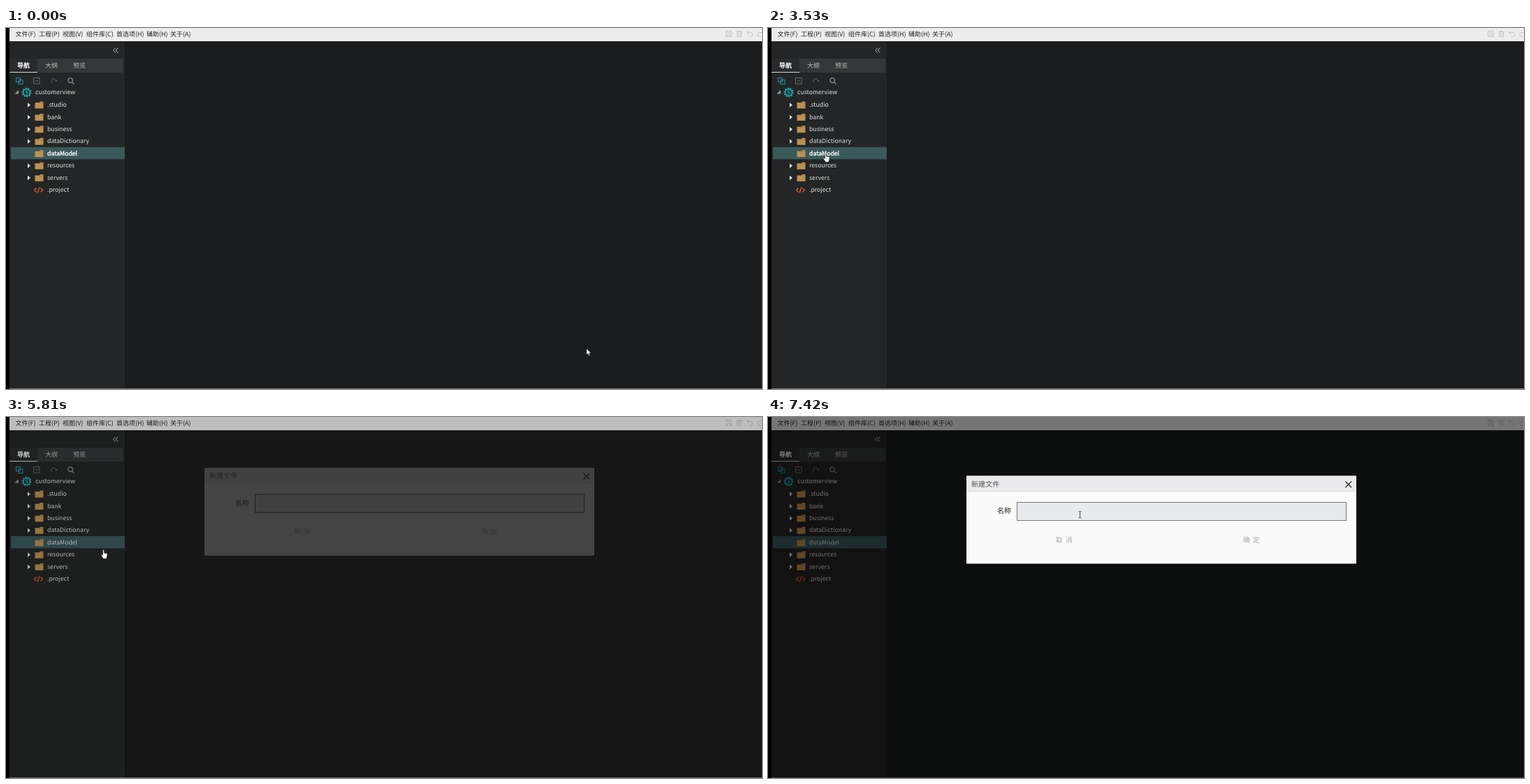
Recreate the animation shown at these times as an HTML page. Size 1082 px wide and 518 px high, loop 7.99 s.

```html
<!DOCTYPE html>
<html>
<head>
<meta charset="utf-8">
<style>
html, body { margin: 0; width: 100%; height: 100%; overflow: hidden; background: #000; }
svg { display: block; }
text { font-family: "Noto Sans CJK SC", "Noto Sans CJK", "Noto Sans", sans-serif; text-rendering: geometricPrecision; white-space: pre; }
.line { fill: none; stroke-width: 1; }
.bold { fill: #fff; stroke: #fff; stroke-width: .35; }
</style>
</head>
<body>
<svg id="stage" width="1082" height="518" viewBox="0 0 1082 518"></svg>
<script>
const LOOP = 7990, MENU = 4900, DIALOG = 5810, FOCUS = 6560;
const ROW0 = 110, PITCH = 17.43;
const ROWS = ['.studio', 'bank', 'business', 'dataDictionary', 'dataModel', 'resources', 'servers', '.project'];
const SELECTED = 4;

const rect = (x, y, w, h, fill, more = '') =>
  `<rect x="${x}" y="${y}" width="${w}" height="${h}" fill="${fill}" ${more}/>`;
const text = (x, mid, size, fill, str, more = '') =>
  `<text x="${x}" y="${mid + size * .36}" font-size="${size}" fill="${fill}" ${more}>${str}</text>`;
const line = (d, color, more = '') => `<path class="line" d="${d}" stroke="${color}" ${more}/>`;
const shape = (d, fill, more = '') => `<path d="${d}" fill="${fill}" ${more}/>`;

function menuBar() {
  const items = [[13.5, '文件(F)'], [47, '工程(P)'], [81, '视图(V)'], [115, '组件库(C)'],
    [158, '首选项(H)'], [201, '辅助(H)'], [235, '关于(A)']];
  const c = '#c6c6c6';
  return rect(5, 0, 1077, 19, '#ededed') +
    items.map(([x, s]) => text(x, 9, 9, '#222', s)).join('') +
    line('M1030.5 4h6.5l1.5 1.5v7h-8zM1032.5 4v3h4v-3M1032.5 12.500v-3h4v3', c) +
    line('M1045 5.500h9M1048 5.500v-1.500h3v1.500M1046.500 5.500v7h6v-7M1048.500 7v4M1050.500 7v4', c) +
    line('M1063 4l-2.500 2.500 2.500 2.500M1060.500 6.500h5a2.800 2.800 0 0 1 0 6h-1.500', c) +
    line('M1082 6.500h-3a2.800 2.800 0 0 0 0 6h1.500', c);
}

function sidePanel() {
  const dim = '#6c6d6e', teal = '#1a9da8';
  return rect(5, 19, 165, 499, '#242526') + rect(170, 19, 1, 499, '#19191a') +
    line('M157 28.500l-3.500 3.500 3.500 3.500M160.500 28.500l-3.500 3.500 3.500 3.500', '#bcbcbc') +
    rect(5, 44, 163, 20, '#353637') + rect(5, 44, 40, 20, '#292a2b') + rect(5, 63, 40, 1, '#d8d8d8') +
    text(16, 53.5, 9, '#fff', '导航', 'class="bold"') +
    text(56, 53.5, 9, '#bdbdbd', '大纲') + text(96, 53.5, 9, '#bdbdbd', '预览') +
    line('M14.500 71.500h6v6h-6zM18 74.500h6v6h-6z', teal) +
    line('M39.500 71.500h8.500v8.500h-8.500zM41.500 75.800h4.500', dim) +
    line('M65.500 78.500a3.600 3.600 0 1 1 6.500-2.500M70.200 75.500l1.800 1.300 1.300-1.800', dim) +
    line('M95.500 75.200a3.300 3.300 0 1 1-6.600 0 3.300 3.300 0 0 1 6.600 0M94.500 77.500l3 3', '#8a8b8c', 'style="stroke-width:1.3"');
}

function gear() {
  const ring = (r, w, more = '') =>
    `<circle cx="29.500" cy="92.500" r="${r}" fill="none" stroke="#1fa9b5" stroke-width="${w}" ${more}/>`;
  return ring(6.2, 1.8, 'pathLength="20" stroke-dasharray="1"') + ring(4.8, 1.7) +
    text(27.3, 92.5, 7.5, '#1fa9b5', 'S', 'font-weight="bold"');
}

function treeRow(name, i) {
  const y = ROW0 + PITCH * i;
  const arrow = i !== SELECTED && i < 7 ? shape(`M31 ${y - 2.8}l4 3.300-4 3.300z`, '#dedede') : '';
  const icon = i < 7
    ? shape(`M41.500 ${y - 3}h6l1.500-1.500h4.500v10h-12z`, '#bb9150') + line(`M47 ${y - 2.5}h6`, '#8d6c3b', 'style="stroke-width:.6"')
    : line(`M43.500 ${y - 2.5}l-3 3 3 3M49.500 ${y - 2.500}l3 3-3 3M47.800 ${y - 3.500}l-2.500 8`, '#df5f2d', 'style="stroke-width:1.3"');
  return rect(7, y - 8.8, 163, 17.4, i === SELECTED ? '#3a595b' : '#2e3033', `id="bar${i}"`) +
    arrow + icon + text(59, y, 8.7, '#e2e2e2', name, `id="name${i}"`);
}

function dialog() {
  const button = (x, a, b) => text(x, 176, 10, '#a9a9aa', a) + text(x + 13.7, 176, 10, '#a9a9aa', b);
  return rect(284, 84.5, 558, 126, '#fafafa', 'rx="1"') + rect(284, 84.5, 558, 22.5, '#eaeaec') +
    rect(284, 106.5, 558, .7, '#d8d8da') +
    text(291, 96, 10.1, '#555', '新建文件') +
    line('M826.500 92.500l8.500 8.500M835 92.500l-8.500 8.500', '#222', 'style="stroke-width:1.200"') +
    text(328, 134.5, 10, '#222', '名称') +
    rect(356.5, 122.5, 471, 26, '#eaeaec', 'id="field" stroke="#444"') +
    rect(365, 130, 1, 10, '#222', 'id="caret"') +
    button(412, '取', '消') + button(680, '确', '定');
}

const HAND = 'M2.600 1.200Q3.500 0 4.400 1.200V5L8 5.800Q9.300 6.200 9.100 7.500L8.500 10.500 7.700 13.300H3.400L.7 9.200Q-.2 7.500 1 7.300L2.600 8.600Z';
const $ = id => document.getElementById(id);

$('stage').innerHTML =
  rect(5, 0, 1077, 518, '#1b1c1d') + menuBar() + sidePanel() +
  shape('M18 89v5.500h-5.500z', '#9a9a9a') + gear() + text(42, 92.3, 8.7, '#e2e2e2', 'customerview') +
  ROWS.map(treeRow).join('') + rect(5, 517, 1077, 1, '#777') +
  `<g id="popup">${rect(86, 178, 135, 266, '#333538')}${text(98, 192, 9, '#e2e2e2', '新建文件')}</g>` +
  rect(5, 0, 1077, 518, '#000', 'id="shade"') +
  `<g id="dialog">${dialog()}</g>` +
  `<g id="cursor">
    <g id="arrow">${shape('M0 0V9L2 7.200 3.400 10.300 4.800 9.700 3.500 6.700H6.200Z', '#fff', 'stroke="#000" stroke-width=".4"')}</g>
    <g id="hand">${shape(HAND, '#fff', 'stroke="#111" stroke-width=".5"')}</g>
    <g id="beam">${line('M.5 .5h1.500l.5.500.5-.500h1.500M2.500 1v8M.5 9.500h1.500l.5-.500.5.500h1.500', '#333', 'style="stroke-width:.9"')}</g>
  </g>`;

// Pointer steps: time, x, y
const PATH = [
  [0, 831, 460], [150, 833, 460], [280, 832, 460], [420, 743, 440], [550, 513, 395], [670, 297, 348],
  [820, 187, 316], [980, 182, 262], [1100, 175, 221], [1240, 152, 194], [1370, 130, 172], [1490, 118, 165],
  [1640, 115, 165], [2040, 108, 169], [2160, 101, 168], [2310, 89, 177], [2580, 86, 177],
  [2860, 98, 177], [2980, 73, 177], [3130, 88, 177], [3250, 80, 178], [3410, 91, 178], [3530, 79, 179],
  [3680, 88, 180], [3810, 80, 180], [3960, 85, 179], [4080, 81, 179], [4210, 83, 179], [4350, 82, 178],
  [4600, 81, 178], [5150, 139, 181], [5300, 155, 184], [5420, 145, 188], [5540, 136, 190],
  [6080, 271, 181], [6200, 352, 158], [6330, 420, 140], [6440, 444, 135]
];

const show = (id, on) => $(id).setAttribute('visibility', on ? 'visible' : 'hidden');

function draw(t) {
  const [, x, y] = PATH.findLast(p => p[0] <= t);
  const inTree = x < 170;
  const inField = x > 400 && t > DIALOG;
  $('cursor').setAttribute('transform', `translate(${x} ${y})`);
  show('hand', inTree);
  show('beam', inField);
  show('arrow', !inTree && !inField);

  const hover = inTree && t < MENU ? Math.round((y - ROW0) / PITCH) : -1;
  ROWS.forEach((_, i) => {
    show('bar' + i, i === SELECTED || i === hover);
    $('name' + i).classList.toggle('bold', i === hover || i === SELECTED && t < MENU);
  });
  show('popup', t >= MENU && t < DIALOG);

  // The dialog slides down while it and the shade fade in
  const k = t < DIALOG ? 0 : t < 5930 ? .2 : t < 6080 ? .85 : 1;
  $('shade').setAttribute('opacity', .5 * k ** .57);
  $('dialog').setAttribute('opacity', k);
  $('dialog').setAttribute('transform', `translate(0 ${-14.4 * (1 - k)})`);

  const focused = t >= FOCUS;
  $('field').setAttribute('fill', focused ? '#e8eaed' : '#eaeaec');
  $('field').setAttribute('stroke', focused ? '#777' : '#444');
  show('caret', t >= 6960 && t < 7420);
}

function tick() {
  draw(performance.now() % LOOP);
  requestAnimationFrame(tick);
}
tick();
</script>
</body>
</html>
```
